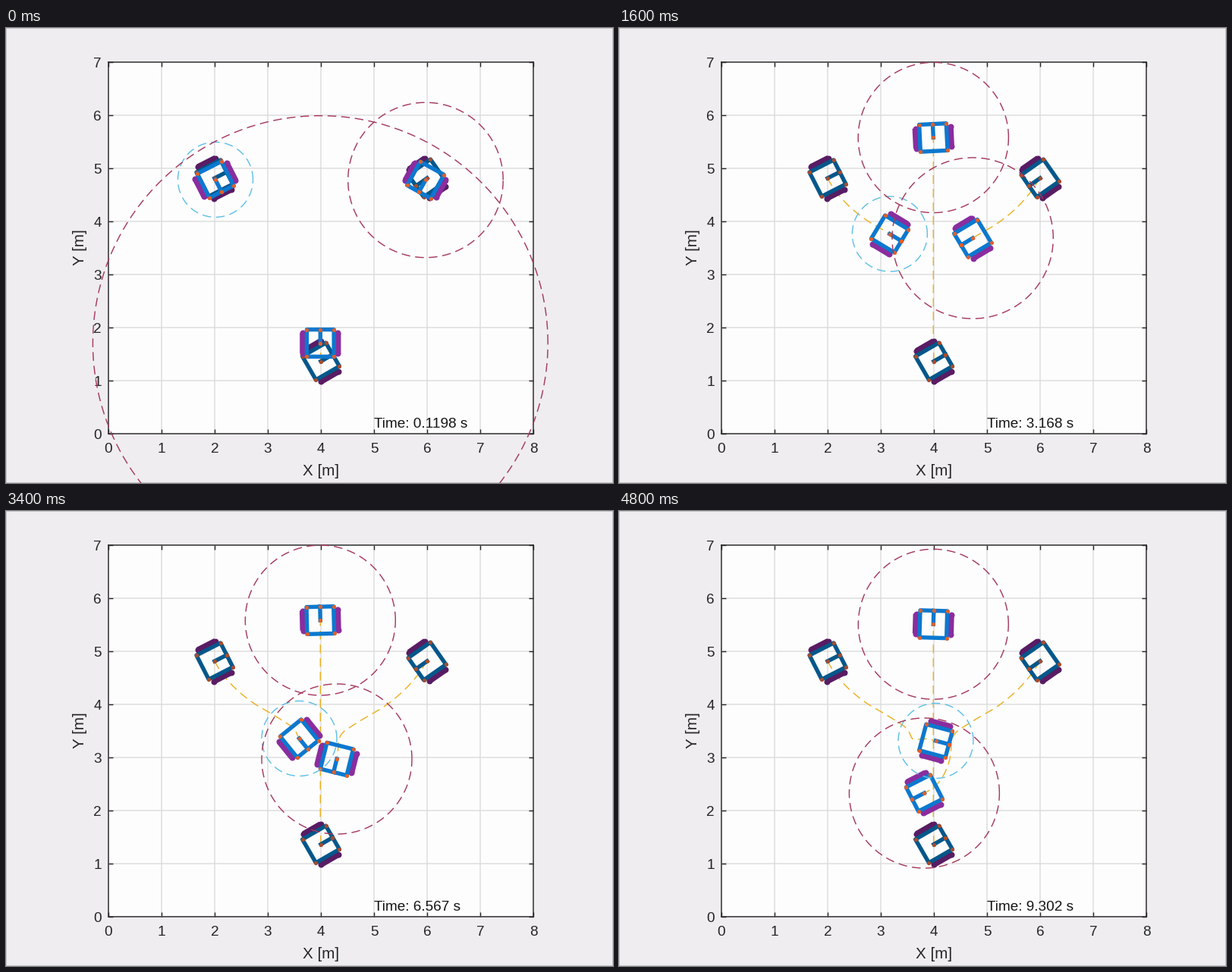
These frames come from a looping animation (800x600 px, 5000 ms). A matplotlib script:

```python
import numpy as np
import matplotlib.pyplot as plt
from matplotlib.animation import FuncAnimation

FRAMES, INTERVAL = 25, 200
PX = 0.72                      # points per pixel at 100 dpi
THIN = 1.43 * PX
INK, YELLOW, RED, SKY = "#262626", "#edb120", "#a5395c", "#5fc0e6"
BRIGHT = dict(body="#0c78cf", wheel="#8a2d9e", dot="#e0602a")
DARK = dict(body="#04578a", wheel="#591c63", dot="#a84c2c")

plt.rcParams.update({"font.family": "Liberation Sans", "path.snap": False,
                     "lines.scale_dashes": False, "axes.linewidth": THIN})

fig = plt.figure(figsize=(8, 6), dpi=100, facecolor="#efedf0",
                 edgecolor="#c4c2c5", linewidth=2 * PX)
ax = fig.add_axes([135 / 800, 65 / 600, 560 / 800, 490 / 600], facecolor="#fdfdfe")
ax.set(xlim=(0, 8), ylim=(0, 7), xticks=range(9), yticks=range(8), axisbelow=True)
ax.grid(color="#dcdcdd", lw=THIN)
ax.tick_params(direction="in", top=True, right=True, length=5.6 * PX, width=THIN,
               color=INK, labelcolor=INK, labelsize=19 * PX)
ax.tick_params(axis="x", pad=12.5 * PX)
ax.tick_params(axis="y", pad=9 * PX)
ax.spines[:].set_color(INK)
label = dict(color=INK, fontsize=20.7 * PX, ha="center", va="center")
fig.text(415 / 800, 16 / 600, "X [m]", **label)
fig.text(97.5 / 800, 310.5 / 600, "Y [m]", rotation=90, **label)
clock = ax.text(5, 0.12, "", color="#141414", fontsize=19 * PX, zorder=7)


def line(color, width, z, **kw):
    return ax.plot([], [], color=color, lw=width * PX, zorder=z, clip_on=False, **kw)[0]


def dashed(color, z):
    return line(color, 1.43, z, dashes=(11.5 * PX, 6.5 * PX), dash_capstyle="butt")


def draw(artist, points):
    artist.set_data(points.real, points.imag)


# Positions are complex numbers x + iy in metres, headings are in degrees.
def turn(degrees):
    return np.exp(1j * np.radians(degrees))


class Robot:
    H = 0.255
    BODY = np.array([0, H, H + H * 1j, -H + H * 1j, -H - H * 1j, H - H * 1j, H])
    WHEEL = np.array([-0.186, 0.186])

    def __init__(self, colors, z):
        wheels = [(line(colors["wheel"], 8, z, solid_capstyle="butt",
                        marker="o", ms=8 * PX, mew=0), self.WHEEL + side)
                  for side in (0.33j, -0.33j)]
        body = line(colors["body"], 5.4, z + 0.1, solid_joinstyle="round")
        dots = line(colors["dot"], 0, z + 0.2, marker="o", ms=5.2 * PX, mew=0, ls="none")
        self.parts = wheels + [(body, self.BODY), (dots, self.BODY)]

    def place(self, position, heading):
        for artist, shape in self.parts:
            draw(artist, position + shape * turn(heading))


class Agent:
    """A driving robot with its start pose, trail and safety circle."""
    RING = turn(np.linspace(0, 360, 361))

    def __init__(self, start, start_heading, path, heading, radius, color):
        self.start, self.path, self.heading, self.radius = start, path, heading, radius
        Robot(DARK, 4).place(start, start_heading)
        self.trail, self.ring = dashed(YELLOW, 3), dashed(color, 6)
        self.robot = Robot(BRIGHT, 5)

    def update(self, t):
        position = self.path(t)
        past = self.path(np.linspace(0, t, 8 * t + 1))
        draw(self.trail, np.append(self.start, past))
        draw(self.ring, position + self.radius(t) * self.RING)
        self.robot.place(position, self.heading(t))


KEYS = np.array([0, 6, 10, 13, 17, 22, 24])


def steer(points, headings):
    """Hermite path through the points, leaving each one along its heading."""
    points = np.array(points)
    speeds = np.abs(np.gradient(points, KEYS)) * turn(np.array(headings))

    def path(t):
        i = np.clip(np.searchsorted(KEYS, t, side="right") - 1, 0, len(KEYS) - 2)
        h = KEYS[i + 1] - KEYS[i]
        u = (t - KEYS[i]) / h
        w = 1 - u
        return (w * w * ((1 + 2 * u) * points[i] + u * h * speeds[i])
                + u * u * ((1 + 2 * w) * points[i + 1] - w * h * speeds[i + 1]))

    return path, lambda t: np.interp(t, KEYS, headings)


def decay(t, scale, power):
    return np.exp(-(t / scale) ** power)


def climb(t):
    """Quick run to the top that eases out, then a slow roll back."""
    return 3.99 + 1j * (5.66 - 3.953 * decay(t, 2.418, 1.135) - 0.0107 * np.maximum(t - 10, 0))


REACH = np.sqrt(2)
agents = [
    Agent(2 + 4.814j, 27,
          *steer([2.014 + 4.786j, 2.886 + 3.929j, 3.393 + 3.621j, 3.543 + 3.457j,
                  3.593 + 3.357j, 3.843 + 3.35j, 4.036 + 3.314j],
                 [-63, -29, -33, -66, -51, 0, -15]),
          lambda t: REACH / 2, SKY),
    Agent(6 + 4.814j, 215,
          *steer([5.971 + 4.779j, 5.036 + 3.864j, 4.486 + 3.529j, 4.336 + 3.307j,
                  4.3 + 2.971j, 4.036 + 2.471j, 3.82 + 2.329j],
                 [241, 209, 213, 260, 256, 224, 207]),
          lambda t: REACH + 0.16 * np.exp(-((t - 5) / 4.5) ** 2), RED),
    Agent(4 + 1.364j, 30, climb, lambda t: 90 + 3 * np.sin(t / 6.4) * (t > 6),
          lambda t: REACH + 2.87 * decay(t, 1.63, 1.26), RED),
]
SECONDS = [0.1198, 2.388, 3.949, 5.102, 6.567, 8.492, 9.302]


def update(frame):
    for agent in agents:
        agent.update(frame)
    clock.set_text(f"Time: {np.interp(frame, KEYS, SECONDS):.4g} s")


anim = FuncAnimation(fig, update, frames=FRAMES, interval=INTERVAL,
                     repeat=True, repeat_delay=0)
plt.show()
```
